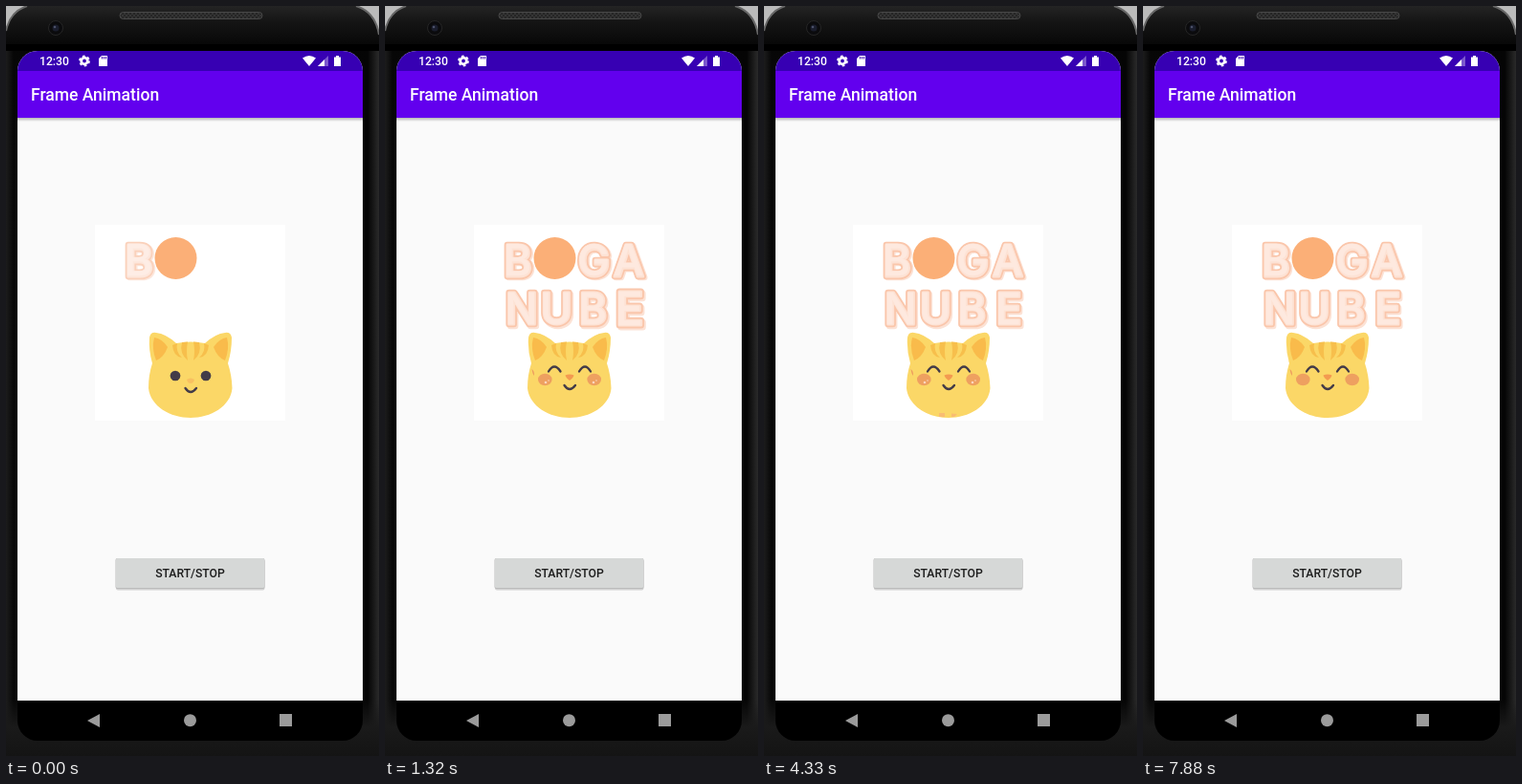
These frames come from a looping animation (390 by 785 pixels, 8000 ms). An HTML page:

```html
<!DOCTYPE html>
<html lang="en">
<head>
<meta charset="utf-8">
<title>Frame Animation</title>
<style>
html, body { margin: 0; width: 100%; height: 100%; overflow: hidden; background: #000; }
svg { display: block; width: 390px; height: 785px; }
text { font-family: Roboto, sans-serif; font-weight: 500; }
.letter { font: 500 45px Inter, sans-serif; text-anchor: middle; stroke-linejoin: round; }
</style>
</head>
<body>
<svg viewBox="0 0 390 785">
  <defs>
    <linearGradient id="top" x2="0" y2="1">
      <stop stop-color="#242424"/><stop offset=".4" stop-color="#151515"/><stop offset="1" stop-color="#080808"/>
    </linearGradient>
    <linearGradient id="sides">
      <stop stop-color="#1c1c1c"/><stop offset=".02" stop-color="#070707"/>
      <stop offset=".5" stop-color="#000"/><stop offset=".97" stop-color="#050505"/><stop offset="1" stop-color="#2a2a2a"/>
    </linearGradient>
    <linearGradient id="bottom" x2="0" y2="1">
      <stop stop-color="#1a1a1a" stop-opacity="0"/><stop offset=".5" stop-color="#1a1a1a"/><stop offset="1" stop-color="#141414"/>
    </linearGradient>
    <linearGradient id="shade" x2="0" y2="1">
      <stop stop-color="#000" stop-opacity=".28"/><stop offset="1" stop-color="#000" stop-opacity="0"/>
    </linearGradient>
    <pattern id="mesh" width="4" height="4" patternUnits="userSpaceOnUse">
      <path fill="#262626" d="M0 0h4v4h-4z"/><path stroke="#383838" stroke-width=".8" d="M0 4L4 0M0 0L4 4"/>
    </pattern>
    <clipPath id="screen"><rect x="12" y="47" width="361" height="722" rx="21"/></clipPath>
  </defs>

  <!-- Phone body -->
  <path fill="url(#sides)" d="M0 0h390v785H0z"/>
  <path fill="url(#top)" d="M0 0h390v40H0z"/>
  <path fill="url(#bottom)" d="M0 725h390v60H0z"/>
  <path fill="#bbb" d="M0 0H22Q4 6 0 26zM390 0H366Q386 6 390 30z"/>
  <path fill="none" stroke="#666" stroke-width="2" d="M0 26Q4 6 22 0M390 30Q386 6 366 0"/>
  <path d="M0 40h390v7H0z"/>
  <rect x="119" y="6.500" width="149" height="7" rx="3.500" fill="url(#mesh)" stroke="#484848"/>
  <circle cx="52" cy="23" r="7.500" fill="#0b0b0d" stroke="#262626"/>
  <circle cx="52" cy="23" r="3.500" fill="#1a1d2c"/>
  <circle cx="51" cy="22" r="1.300" fill="#4a5068"/>

  <!-- App screen -->
  <g clip-path="url(#screen)">
    <path fill="#fafafa" d="M12 47h361v680H12z"/>
    <path fill="#3700b3" d="M12 47h361v21H12z"/>
    <path fill="#6200ee" d="M12 68h361v49H12z"/>
    <path fill="url(#shade)" d="M12 117h361v4H12z"/>
    <path d="M12 727h361v42H12z"/>
  </g>
  <g fill="#fff">
    <text x="35" y="62" font-size="12.200">12:30</text>
    <text x="26" y="99" font-size="17.550">Frame Animation</text>
    <circle cx="82" cy="57.500" r="3.300" fill="none" stroke="#fff" stroke-width="2.800"/>
    <circle cx="82" cy="57.500" r="5" fill="none" stroke="#fff" stroke-width="1.800" stroke-dasharray="2.618"/>
    <path d="M100 52h6v11h-9v-8z"/>
    <path stroke="#3700b3" d="M100.500 53v2.500M102.500 53v2.500M104.500 53v2.500"/>
    <path d="M310 54.500Q317 49.500 324 54.500L317 63z"/>
    <path opacity=".35" d="M326 63L337 52V63z"/><path d="M326 63L333 56V63z"/>
    <path d="M343 53.500h2V52h3v1.500h2V63h-7z"/>
  </g>
  <g fill="#9b9b9b">
    <path d="M85 748L98 741V755z"/><circle cx="192.500" cy="747.700" r="6.500"/><path d="M286 741h13v13h-13z"/>
  </g>
  <rect x="115" y="579" width="155.500" height="32.500" rx="2" fill="#000" opacity=".16"/>
  <rect x="114.500" y="578" width="156" height="32" rx="2" fill="#bbb"/>
  <rect x="115" y="578" width="155" height="31" rx="1.500" fill="#d6d8d7"/>
  <text x="192.500" y="598" font-size="12.200" text-anchor="middle" fill="#1c1c1c">START/STOP</text>

  <!-- Picture card -->
  <path fill="#fff" d="M93 229h199v205H93z"/>
  <circle cx="177.500" cy="264" r="22" fill="#fbaf77"/>
  <g id="letters"></g>
  <path fill="#fbd767" d="M150 347Q151 341 157 342Q167 343 178 353Q193 350 208 353Q219 343 229 342Q235 341 236 347Q236 361 232 374Q236 386 236.500 400C235 419 214 431 193 431C172 431 151 419 149 400Q149 386 153 374Q149 360 150 347Z"/>
  <g id="markings">
    <path fill="#f9bb4b" d="M155 347Q163 348 169 357Q165 368 157 371Q152 358 155 347Z"/>
    <path fill="#f7bf4c" d="M174 355L179 353Q177 362 184 368Q175 367 174 355ZM184 352L190 351.500Q188 361 190 371Q181 364 184 352Z"/>
  </g>
  <use href="#markings" transform="matrix(-1 0 0 1 386 0)"/>
  <g id="blush" fill="#eea060">
    <ellipse cx="167.300" cy="391" rx="7.300" ry="6.200"/><ellipse cx="218.700" cy="391" rx="7.300" ry="6.200"/>
    <path d="M153.500 380q3 2 2.500 7q-2-2-2.500-7z"/>
  </g>
  <g id="sparkles" fill="#fbd5bd">
    <circle cx="168" cy="394" r="1.300"/><circle cx="171" cy="392" r=".8"/>
    <circle cx="218" cy="394" r="1.300"/><circle cx="221" cy="392" r=".8"/>
  </g>
  <path id="chin" fill="#f9bd72" d="M183 426h6v4h-6zM196 426.500l6 .5l-3 3h-3z"/>
  <path id="nose"/>
  <g fill="none" stroke="#433b48" stroke-width="2.300" stroke-linecap="round">
    <path id="mouth" d="M187.500 397Q193 405 199 397"/>
    <path id="eyes"/>
  </g>
</svg>
<script>
const LOOP = 8000;
const byId = id => document.getElementById(id);
const show = (id, opacity) => byId(id).setAttribute('opacity', opacity);
const draw = (id, d) => byId(id).setAttribute('d', d);

// Letters pop in on fixed ticks: small, oversized, settled.
const ticks = [0, 70, 200, 330, 460, 590, 790, 990, 1190, 1320, 1520];
const popScale = [.62, 1.08, 1];
const letters = [
  ['B', 139, 282.5, -2], ['G', 218.5, 282.5, 1], ['A', 255, 282.5, 2],
  ['N', 143, 333, 4], ['U', 179.5, 333, 5], ['B', 217.5, 333, 6], ['E', 256, 333, 8]
].map(([char, x, baseline, start]) => {
  const layer = (color, width, shift = 0) =>
    `<text class="letter" x="${shift}" y="${16.5 + shift}" fill="${color}" stroke="${color}" stroke-width="${width}">${char}</text>`;
  const node = document.createElementNS('http://www.w3.org/2000/svg', 'g');
  node.innerHTML = layer('#fce2d5', 6.5, 1.5) + layer('#fac6ab', 6.5) + layer('#fde2d4', 3) + layer('#fee9df', .5, -.5);
  byId('letters').append(node);
  return { node, x, y: baseline - 16.5, start };
});

// Each entry: time, eye shape, blush strength.
const faces = [
  [0, 'open', 0], [460, 'flat', .1], [590, 'flat', .25], [790, 'flat', .45],
  [990, 'happy', .75], [1190, 'happy', 1],
  [4730, 'happy', .75], [4930, 'happy', .45], [5130, 'flat', .25], [5330, 'flat', 0], [5530, 'open', 0],
  [7080, 'flat', 0], [7280, 'flat', .3], [7480, 'flat', .55], [7680, 'happy', .8], [7880, 'happy', 1]
];
const eyePaths = {
  open: 'M177 384.150a2.850 2.850 0 1 0 .01 0zM209 384.150a2.850 2.850 0 1 0 .01 0z',
  flat: 'M171 384H183.500M203 384H215',
  happy: 'M171 382.500Q177 372.500 183.500 382.500M203 382.500Q209 372.500 215 382.500'
};

function render(t) {
  const tick = ticks.findLastIndex(time => t >= time);
  for (const { node, x, y, start } of letters) {
    const age = tick - start;
    const scale = age < 0 ? 0 : popScale[Math.min(age, 2)];
    node.setAttribute('transform', `translate(${x} ${y}) scale(${scale})`);
  }
  letters[0].node.setAttribute('opacity', t < 70 ? .8 : 1);

  const [, eyes, blush] = faces.findLast(([time]) => t >= time);
  const open = eyes === 'open';
  draw('eyes', eyePaths[eyes]);
  byId('eyes').setAttribute('fill', open ? '#433b48' : 'none');
  byId('eyes').setAttribute('stroke-width', open ? 5 : 2.3);
  byId('mouth').setAttribute('transform', `translate(0 ${open ? 3 : 0})`);
  draw('nose', open ? 'M189 391Q193 388 197 391Q196 395 193 395Q190 395 189 391Z'
                    : 'M188.500 386.500Q193 384.500 197.500 386.500Q197 389 193 392Q189 389 188.500 386.500Z');
  byId('nose').setAttribute('fill', open ? '#f8c061' : '#f39a50');
  show('blush', blush);
  show('sparkles', t >= 1190 && t < 4930 ? 1 : 0);
  show('chin', t >= 1850 && t < 4930 ? 1 : 0);
}

const startTime = performance.now();
(function loop() {
  render((performance.now() - startTime) % LOOP);
  requestAnimationFrame(loop);
})();
</script>
</body>
</html>
```
